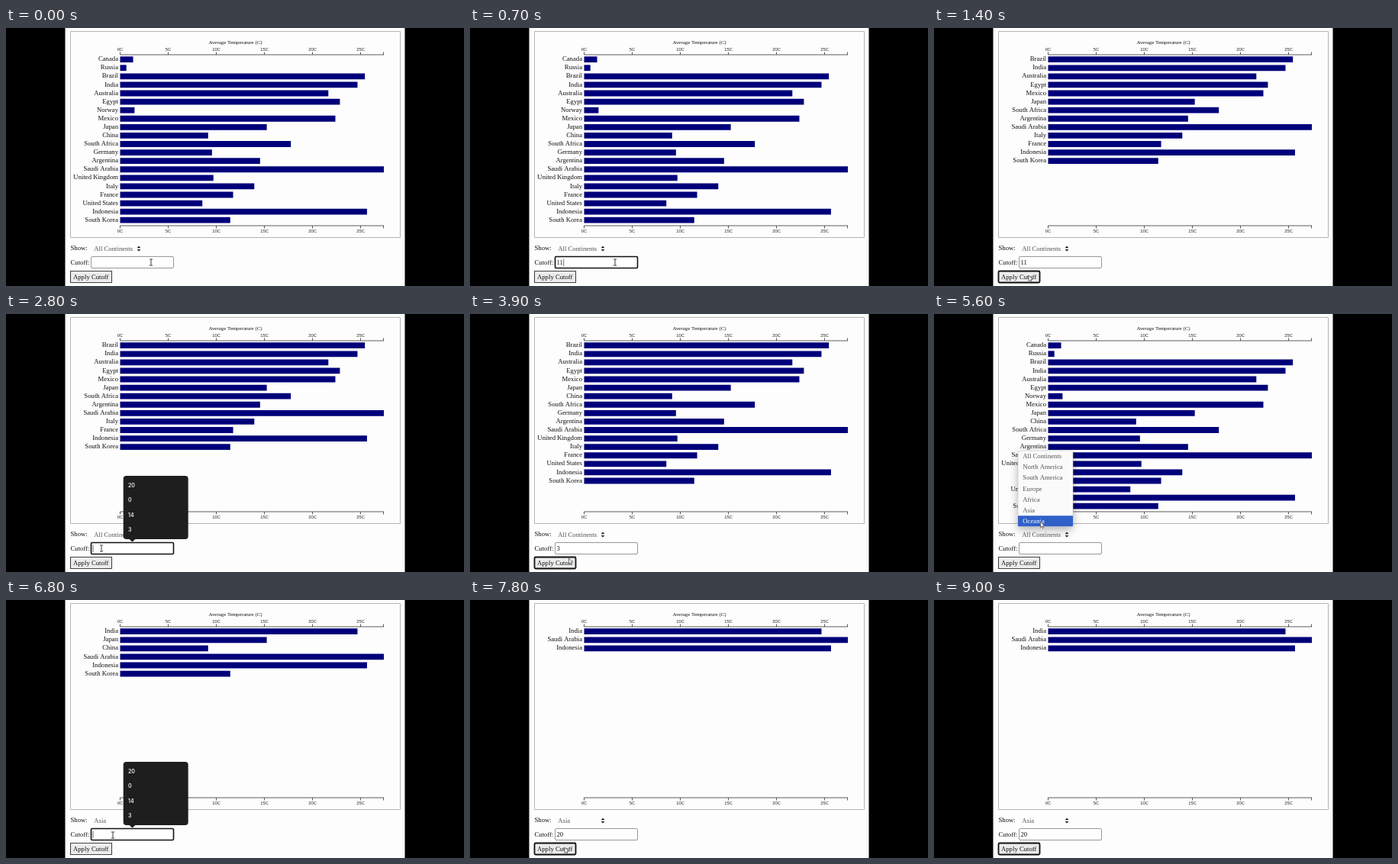
Write an HTML page with a canvas that moves like this. It is 600 by 338 pixels and loops after 9.1 s.

```html
<!DOCTYPE html>
<html lang="en">
<head>
<meta charset="utf-8">
<title>Average Temperature</title>
<style>
  html, body { margin: 0; width: 100%; height: 100%; overflow: hidden; background: #000; }
  canvas { display: block; width: 600px; height: 338px; }
</style>
</head>
<body>
<canvas id="stage"></canvas>
<script>
const LOOP = 9100, STEP = 100;
const SERIF = '"Liberation Serif", serif', SANS = '"Liberation Sans", sans-serif';
const LEFT = 149.5, RIGHT = 495, PER_DEGREE = 12.6, ROW = 11.08;

const countries = [
  ['Canada', 1.35], ['Russia', 0.65], ['Brazil', 25.45], ['India', 24.68, 'Asia'],
  ['Australia', 21.65], ['Egypt', 22.85], ['Norway', 1.5], ['Mexico', 22.38],
  ['Japan', 15.25, 'Asia'], ['China', 9.15, 'Asia'], ['South Africa', 17.75], ['Germany', 9.55],
  ['Argentina', 14.55], ['Saudi Arabia', 27.42, 'Asia'], ['United Kingdom', 9.7], ['Italy', 13.95],
  ['France', 11.75], ['United States', 8.55], ['Indonesia', 25.67, 'Asia'], ['South Korea', 11.45, 'Asia']
];
const regions = ['All Continents', 'North America', 'South America', 'Europe', 'Africa', 'Asia', 'Oceania'];
const history = ['20', '0', '14', '3'];

// Each entry changes part of the page state from its time on.
const events = [
  [0, { loaded: true, region: regions[0], cutoff: 0, typed: '', focus: '', menu: false }],
  [200, { focus: 'field' }],
  [500, { typed: '1' }],
  [700, { typed: '11' }],
  [1300, { focus: 'button', cutoff: 11 }],
  [2000, { focus: 'field' }],
  [2300, { typed: '1' }],
  [2500, { typed: '' }],
  [3200, { typed: '3' }],
  [3800, { focus: 'button', cutoff: 3 }],
  [4700, { loaded: false, focus: '', typed: '', cutoff: 0 }],
  [4800, { loaded: true }],
  [5300, { menu: true }],
  [6000, { menu: false, region: 'Asia' }],
  [6700, { focus: 'field' }],
  [7000, { typed: '2' }],
  [7200, { typed: '20' }],
  [7600, { focus: 'button', cutoff: 20 }]
];

// Pointer stops: time, x, y
const pointerPath = [
  [0, 190, 307], [700, 190, 307], [1200, 124, 324], [1800, 124, 324], [2000, 125, 307],
  [3300, 125, 307], [3700, 129.5, 320], [4300, 129.5, 320], [4500, 133.5, 308],
  [4800, 133.5, 308], [5200, 144, 289], [5400, 144, 289], [5600, 139.5, 272],
  [5700, 139.5, 272], [5900, 138, 257], [6000, 138, 257], [6600, 140, 308],
  [7200, 140, 308], [7500, 124, 324], [8600, 124, 324], [9000, 426, 20]
];

const canvas = document.getElementById('stage');
const ctx = canvas.getContext('2d');
const scale = window.devicePixelRatio || 1;
canvas.width = 600 * scale;
canvas.height = 338 * scale;

function text(str, x, y, { size = 8.7, color = '#111', align = 'left', family = SERIF, weight = '' } = {}) {
  ctx.font = `${weight} ${size}px ${family}`;
  ctx.fillStyle = color;
  ctx.textAlign = align;
  ctx.fillText(str, x, y);
}

function box(x, y, w, h, { fill, stroke, line = 1, radius = 0 }) {
  ctx.beginPath();
  ctx.roundRect(x, y, w, h, radius);
  if (fill) { ctx.fillStyle = fill; ctx.fill(); }
  if (stroke) { ctx.strokeStyle = stroke; ctx.lineWidth = line; ctx.stroke(); }
}

function polygon(points, fill, stroke) {
  ctx.beginPath();
  points.forEach(([x, y]) => ctx.lineTo(x, y));
  ctx.closePath();
  ctx.fillStyle = fill;
  ctx.fill();
  if (stroke) { ctx.strokeStyle = stroke; ctx.lineWidth = 0.8; ctx.stroke(); }
}

function lines(color, width, ...segments) {
  ctx.beginPath();
  for (const [x1, y1, x2, y2] of segments) { ctx.moveTo(x1, y1); ctx.lineTo(x2, y2); }
  ctx.strokeStyle = color;
  ctx.lineWidth = width;
  ctx.stroke();
}

function axis(y, tick, labelY) {
  const segments = [[LEFT, y, RIGHT, y], [RIGHT - 0.5, y, RIGHT - 0.5, y + tick]];
  for (let degrees = 0; degrees <= 25; degrees += 5) {
    const x = LEFT + degrees * PER_DEGREE;
    segments.push([x, y, x, y + tick]);
    text(degrees + 'C', x, labelY, { size: 5.8, family: SANS, align: 'center', color: '#222' });
  }
  lines('#333', 0.8, ...segments);
}

function chart({ region, cutoff }) {
  text('Average Temperature (C)', 300.5, 21.3, { size: 6.9, align: 'center' });
  axis(35, -3.5, 30);
  axis(259, 3.5, 268.2);
  countries
    .filter(([, degrees, area]) => degrees >= cutoff && (region === regions[0] || area === region))
    .forEach(([name, degrees], i) => {
      const y = 37.3 + i * ROW;
      text(name, 147, y + 6, { align: 'right' });
      box(LEFT, y, degrees * PER_DEGREE, 7.8, { fill: '#00007a' });
    });
}

function controls({ region, typed, focus, loaded }) {
  text('Show:', 84.5, 291.2);
  text(region, 115.3, 292, { color: '#555' });
  polygon([[171.6, 288.3], [174, 285.6], [176.4, 288.3]], '#222');
  polygon([[171.6, 289.9], [174, 292.6], [176.4, 289.9]], '#222');

  const inField = focus === 'field', onButton = focus === 'button';
  text('Cutoff:', 84.5, 310);
  box(111.5, 299.5, 108, 15, {
    fill: '#fff', stroke: inField ? '#111' : '#999', line: inField ? 1.6 : 1, radius: 1.5
  });
  text(typed, 113.5, 310);
  if (inField) {
    const x = 114 + typed.length * 4.35;
    lines('#333', 0.7, [x, 302.5, x, 312]);
  }
  if (!loaded) return;
  box(84.5, 318.5, 54, 15, {
    fill: '#ececec', stroke: onButton ? '#111' : '#444', line: onButton ? 1.8 : 1.1, radius: onButton ? 1.5 : 0
  });
  text('Apply Cutoff', 88, 329);
}

function regionMenu(pointerY) {
  ctx.save();
  ctx.shadowColor = 'rgba(0,0,0,.3)';
  ctx.shadowBlur = 12 * scale;
  ctx.shadowOffsetY = 4 * scale;
  box(110, 179, 72, 99.5, { fill: '#fafafa', radius: 3 });
  ctx.restore();
  box(110, 179, 72, 99.5, { stroke: '#ccc', line: 0.6, radius: 3 });
  const pitch = 14.22, hovered = Math.floor((pointerY - 179) / pitch);
  regions.forEach((name, i) => {
    const y = 186 + i * pitch;
    if (i === hovered) box(110, y - 7, 72, 14, { fill: '#2f60c8', radius: 1 });
    text(name, 116.3, y + 3, { color: i === hovered ? '#fff' : '#555' });
  });
}

function suggestions() {
  polygon([[160.5, 294], [165.5, 298.5], [170.5, 294]], '#1e1e1e');
  box(153.7, 212, 85, 83, { fill: '#1e1e1e', radius: 4 });
  history.forEach((value, i) =>
    text(value, 160, 226.7 + i * 19.5, { size: 7, family: 'Inter, sans-serif', weight: 600, color: '#eee' }));
}

function pointerAt(t) {
  const next = pointerPath.findIndex(stop => stop[0] > t);
  const [t0, x0, y0] = pointerPath[next - 1], [t1, x1, y1] = pointerPath[next];
  const p = (t - t0) / (t1 - t0), eased = p * p * (3 - 2 * p);
  return [x0 + (x1 - x0) * eased, y0 + (y1 - y0) * eased];
}

function pointer(x, y, loaded) {
  if (loaded && x > 111 && x < 220 && y > 299 && y < 315) {
    lines('#222', 0.9, [x, y - 3.5, x, y + 3.5],
      [x - 2, y - 4, x + 2, y - 4], [x - 2, y + 4, x + 2, y + 4]);
  } else {
    const outline = [[0, 0], [0, 7.5], [1.7, 6], [2.8, 8.6], [4, 8.1], [2.9, 5.6], [5.1, 5.4]];
    polygon(outline.map(([dx, dy]) => [x + dx, y + dy]), '#fff', '#555');
  }
}

function draw(t) {
  const state = Object.assign({}, ...events.filter(([at]) => at <= t).map(([, change]) => change));
  ctx.setTransform(scale, 0, 0, scale, 0, 0);
  box(0, 0, 600, 338, { fill: '#000' });
  box(77.5, 0, 445, 338, { fill: '#fdfdfd' });
  box(84.5, 4.5, 432, 270, { stroke: '#b4b4b4' });
  if (state.loaded) chart(state);
  controls(state);
  const visible = t < 9000, [x, y] = visible ? pointerAt(t) : [0, 0];
  if (state.menu) regionMenu(y);
  if (state.focus === 'field' && !state.typed) suggestions();
  if (visible) pointer(x, y, state.loaded);
}

const start = performance.now();
function tick() {
  const elapsed = (performance.now() - start) % LOOP;
  draw(Math.floor(elapsed / STEP) * STEP);
  requestAnimationFrame(tick);
}
tick();
</script>
</body>
</html>
```
